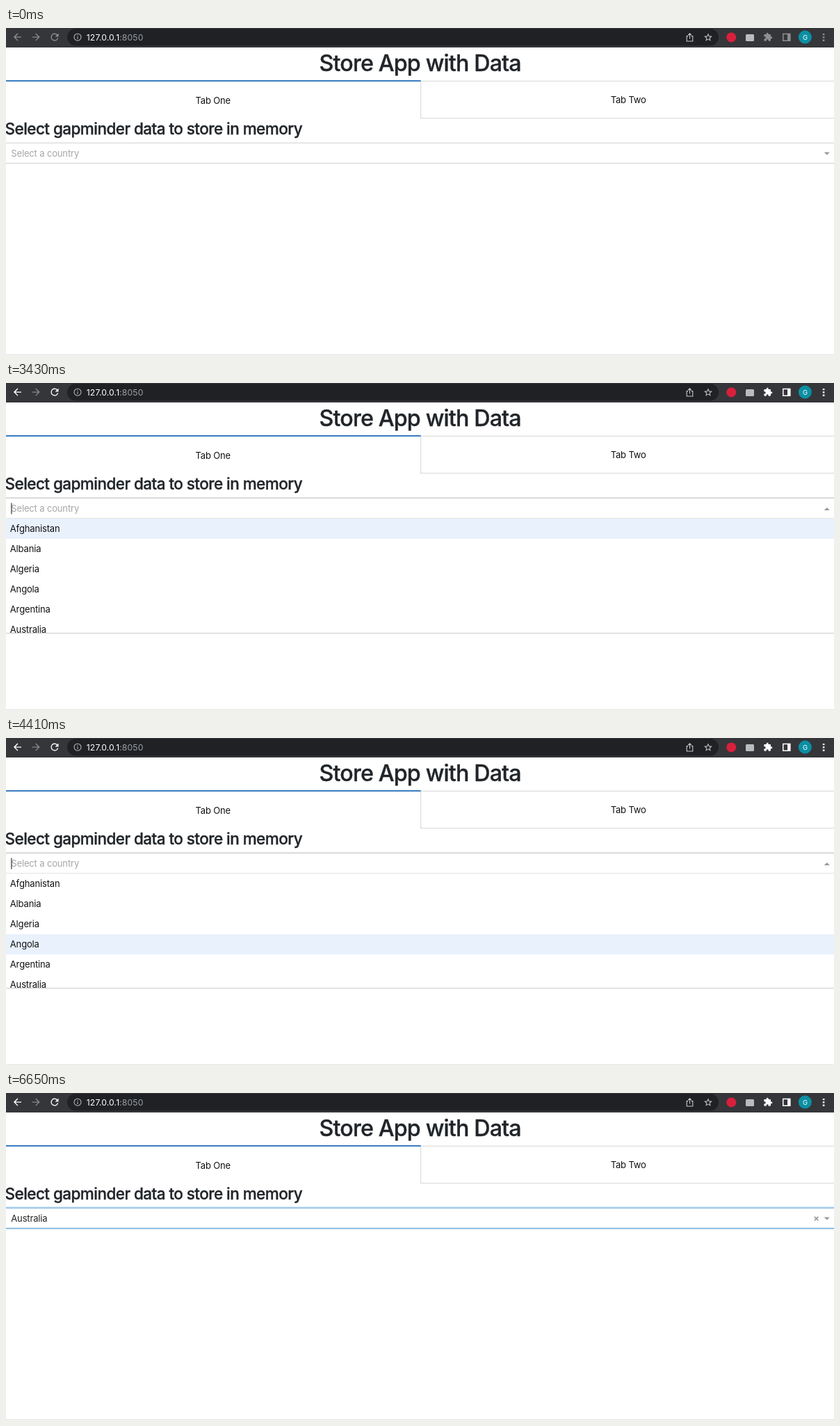
These frames come from a looping animation (1191 px wide and 470 px high, 8 s). An HTML page:

```html
<!DOCTYPE html>
<html lang="en">
<head>
<meta charset="utf-8">
<title>Store App with Data</title>
<style>
  html, body { margin: 0; width: 100%; height: 100%; overflow: hidden; background: #fff; }
  svg { display: block; width: 1191px; height: 470px; }
  text { font: 400 13px Inter, Roboto, sans-serif; font-optical-sizing: none; letter-spacing: -.15px; fill: #111; white-space: pre; }
  .title, .heading { font-weight: 500; fill: #212529; stroke: #212529; stroke-width: .35px; }
  .title { font-size: 32.2px; letter-spacing: -.83px; }
  .heading { font-size: 22.5px; letter-spacing: -.555px; }
  .url { font-size: 12.2px; letter-spacing: .12px; fill: #fff; }
  .mid { text-anchor: middle; }
</style>
</head>
<body>
<svg viewBox="0 0 1191 470" xmlns="http://www.w3.org/2000/svg">
  <defs><clipPath id="menuClip"><rect y="195" width="1191" height="164.5"/></clipPath></defs>
  <rect width="1191" height="470" fill="#fff"/>

  <g id="toolbar">
    <rect width="1191" height="28" fill="#35363a"/>
    <rect x="88" y="1" width="937" height="24.5" rx="12.2" fill="#202124"/>
    <path transform="translate(8.2 4.8) scale(.69)" class="live" d="M20 11H7.83l5.59-5.59L12 4l-8 8 8 8 1.41-1.41L7.83 13H20z"/>
    <path transform="translate(34.9 4.8) scale(.69)" fill="#87888b" d="M12 4l-1.41 1.41L16.17 11H4v2h12.17l-5.58 5.59L12 20l8-8z"/>
    <path transform="translate(61.7 4.8) scale(.69)" class="live" d="M17.65 6.35A7.96 7.96 0 0 0 12 4a8 8 0 1 0 7.73 10h-2.08A6 6 0 1 1 12 6c1.66 0 3.14.69 4.22 1.78L13 11h7V4z"/>
    <g fill="none" stroke="#b4b7ba" stroke-width="1.1">
      <circle cx="103" cy="13.2" r="5"/>
      <path d="M103 12.4v3.6M103 10.2v1.2"/>
    </g>
    <text class="url" x="115.8" y="17.6">127.0.0.1<tspan fill="#9aa0a6">:8050</tspan></text>
    <path d="M981.2 11.6h-2v7.4h8.6v-7.4h-2M983.5 15.5V8.2M981 10.4l2.5-2.5 2.5 2.5" fill="none" stroke="#c4c7ca" stroke-width="1.1"/>
    <path transform="translate(1002.9 6.4) scale(.59)" fill="#c9ccd0" d="M22 9.24l-7.19-.62L12 2 9.19 8.63 2 9.24l5.46 4.73L5.82 21 12 17.27 18.18 21l-1.63-7.03zM12 15.4l-3.76 2.27 1-4.28-3.32-2.88 4.38-.38L12 6.1l1.71 4.04 4.38.38-3.32 2.88 1 4.28z"/>
    <circle cx="1043.3" cy="13.4" r="7" fill="#d8203c"/>
    <rect x="1064" y="9" width="12" height="10" rx="1.5" fill="#b9bcbe"/>
    <path transform="translate(1089.2 6.2) scale(.57)" class="live" d="M20.5 11H19V7c0-1.1-.9-2-2-2h-4V3.5a2.5 2.5 0 0 0-5 0V5H4c-1.1 0-2 .9-2 2v3.8h1.5a2.7 2.7 0 0 1 0 5.4H2V20c0 1.1.9 2 2 2h3.8v-1.5a2.7 2.7 0 0 1 5.4 0V22H17c1.1 0 2-.9 2-2v-4h1.5a2.5 2.5 0 0 0 0-5z"/>
    <path class="live" fill-rule="evenodd" d="M1117 7.8h11.6v11.2H1117zM1118.5 9.3v8.2h5.6V9.3z"/>
    <circle cx="1149.4" cy="13.1" r="9.5" fill="#0b8fa3"/>
    <text class="mid" x="1149.4" y="16.8" style="font-size:9.5px;fill:#fff">G</text>
    <path class="live" d="M1174.8 7.9h2.6v2.4h-2.6zM1174.8 12.2h2.6v2.4h-2.6zM1174.8 16.5h2.6v2.4h-2.6z"/>
  </g>

  <text class="title mid" x="595.7" y="62">Store App with Data</text>
  <path d="M597 76.3h594M596.7 77v53M596.2 129.7H1191" fill="none" stroke="#d6d6d6"/>
  <rect y="75" width="596.7" height="2" fill="#3b7cc0"/>
  <text class="mid" x="297.8" y="108.7">Tab One</text>
  <text class="mid" x="895.2" y="108.2">Tab Two</text>
  <text class="heading" x="-1.5" y="153">Select gapminder data to store in memory</text>

  <g id="glow" fill="#e3f0fc">
    <rect y="162.6" width="1191" height="2.4"/>
    <rect y="194.6" width="1191" height="2.4"/>
  </g>
  <path id="topEdge" d="M0 165.2h1191"/>
  <path id="bottomEdge" d="M0 194.4h1191"/>
  <text id="value" x="7.3" y="185"></text>
  <path id="caret" d="M7.9 172.5v16" stroke="#222" stroke-width="1.1"/>
  <path id="clear" d="M1162.8 177.7l5.6 5.6m0-5.6l-5.6 5.6" stroke="#8c8c8c" stroke-width="1.4"/>
  <path id="arrow" fill="#999"/>

  <g id="menu">
    <g clip-path="url(#menuClip)">
      <g id="list">
        <rect id="hover" width="1191" height="29" fill="#e9f1fd"/>
      </g>
      <rect id="thumb" x="1185.8" y="195" width="6.4" height="11" rx="2.6" fill="#7d7d7d"/>
    </g>
    <path d="M0 359.6h1191" stroke="#cacaca"/>
  </g>
  <path d="M0 469.7h1191" stroke="#c4c4c4" stroke-width=".6"/>
</svg>

<script>
  const LOOP = 8000, ROW = 29, MENU_TOP = 195;
  const FOCUS = 1890, OPEN = 3430, SCROLL = 5810, PICK = 6370;
  const hoverTimes = [3990, 4200, 4340, 4830, SCROLL];
  const caretTimes = [OPEN, 3850, 4410, 4970, 5460, 6020, PICK];
  const countries = ['Afghanistan', 'Albania', 'Algeria', 'Angola', 'Argentina', 'Australia'];

  const $ = id => document.getElementById(id);
  const set = (id, attrs) => {
    for (const key in attrs) $(id).setAttribute(key, attrs[key]);
  };
  const show = (id, on) => set(id, { visibility: on ? 'visible' : 'hidden' });
  const passed = (times, t) => times.filter(at => t >= at).length;

  countries.forEach((name, i) => {
    const label = document.createElementNS('http://www.w3.org/2000/svg', 'text');
    label.setAttribute('x', 5.8);
    label.setAttribute('y', MENU_TOP + i * ROW + 19.4);
    label.textContent = name;
    $('list').append(label);
  });
  const live = document.querySelectorAll('.live');

  function draw(t) {
    const open = t >= OPEN && t < PICK;
    const picked = t >= PICK;
    const scrolled = t >= SCROLL;
    const row = passed(hoverTimes, t);

    live.forEach(icon => icon.setAttribute('fill', t < FOCUS ? '#8e8f92' : '#fff'));

    show('menu', open);
    show('thumb', open && scrolled);
    set('list', { transform: `translate(0 ${scrolled ? -8.4 : 0})` });
    set('hover', { y: MENU_TOP + row * ROW });

    show('caret', passed(caretTimes, t) % 2 === 1 && open);
    show('glow', picked);
    show('clear', picked);
    set('topEdge', { stroke: picked ? '#4a94d2' : open ? '#b5b5b5' : '#cfcfcf' });
    set('bottomEdge', { stroke: picked ? '#4a94d2' : open ? '#e2e2e2' : '#cfcfcf' });
    set('arrow', { d: open ? 'M1176.8 183h8l-4-4z' : 'M1176.8 178.6h8l-4 4z' });
    $('value').textContent = picked ? 'Australia' : 'Select a country';
    $('value').style.fill = picked ? '#222' : '#a6a6a6';
  }

  const start = performance.now();
  function tick() {
    draw((performance.now() - start) % LOOP);
    requestAnimationFrame(tick);
  }
  tick();
</script>
</body>
</html>
```
